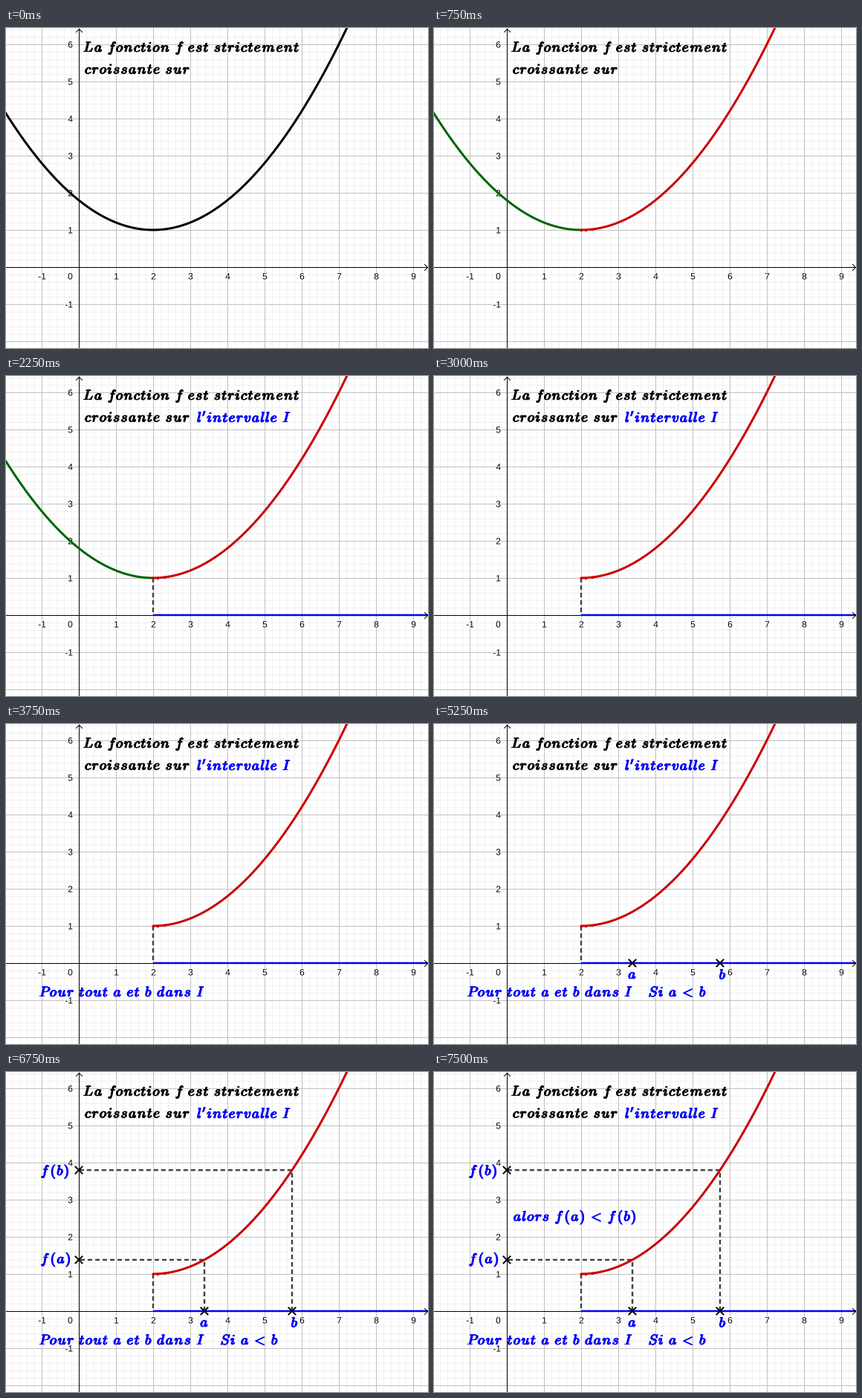
Write a matplotlib script that moves like this. It is 568 px wide and 431 px high and loops after 9750 ms.

```python
import numpy as np
import matplotlib.pyplot as plt
from matplotlib import patheffects
from matplotlib.animation import FuncAnimation
from matplotlib.mathtext import MathTextParser
from matplotlib.patches import PathPatch
from matplotlib.path import Path
from matplotlib.textpath import TextPath
from matplotlib.transforms import Affine2D

W, H, DPI = 568, 431, 64
PX = 72 / DPI                     # one pixel in points
OX, OY, UNIT = 98, 322, 50        # origin and unit length in pixels
STEP_MS, STEPS = 750, 13
BLACK, GRAY, GREEN, RED, BLUE = "#000000", "#404040", "#006400", "#cc0000", "#0000f5"

plt.rcParams["mathtext.fontset"] = "cm"
plt.rcParams["font.family"] = "Liberation Sans"
plt.rcParams["font.size"] = 10

fig = plt.figure(figsize=(W / DPI, H / DPI), dpi=DPI, facecolor="white")
ax = fig.add_axes([0, 0, 1, 1])
ax.set_xlim(0, W)
ax.set_ylim(H, 0)
ax.axis("off")

parser = MathTextParser("path")
layers = []                       # (artists, first step, end step)


def px(x):
    return OX + UNIT * x


def py(y):
    return OY - UNIT * y


def f(x):
    return 0.2 * (x - 2) ** 2 + 1


def line(xs, ys, color, width, z=3, **kw):
    return ax.plot(xs, ys, color=color, lw=width * PX, zorder=z, snap=False, **kw)


def hairline(xs, ys, color, z):
    """One-pixel line through pixel centres."""
    line(np.array(xs) + 0.5, np.array(ys) + 0.5, color, 1, z)


def show(first, artists, end=STEPS):
    layers.append((artists, first, end))


def glyph_source(char):
    return r"$^{\prime}$" if char == "'" else f"${char}$"


def math_text(x, base, text, color=BLUE, em=19, bold=1.17, smear=0.55):
    """Bold math italic: glyphs thickened sideways, advances grown in proportion."""
    gaps = {" ": 0.333, "\u200a": 0.11}
    paths = []
    for char in text:
        if char in gaps:
            x += gaps[char] * em
            continue
        src = glyph_source(char)
        natural = parser.parse(src, dpi=7200).width / 1000 * em
        glyph = TextPath((0, 0), src, size=em)
        for dx in (-smear, 0, smear):
            left = x + natural * (bold - 1) / 2 + dx
            paths.append(Affine2D().scale(1, -1).translate(left, base).transform_path(glyph))
        x += natural * bold
    patch = PathPatch(Path.make_compound_path(*paths), facecolor=color, edgecolor=color,
                      lw=0.3 * PX, joinstyle="round", zorder=8, snap=False)
    return [ax.add_patch(patch)]


def curve(x0, x1, color):
    xs = np.linspace(x0, x1, 200)
    return line(px(xs), py(f(xs)), color, 3, z=4, solid_capstyle="round")


def dashed(*points):
    xs, ys = zip(*points)
    return line(xs, ys, GRAY, 2.4, z=3, dashes=(6 / 2.4, 4 / 2.4), dash_capstyle="butt")


def cross(x, y, r=4.5):
    return (line([x - r, x + r], [y - r, y + r], BLACK, 2, z=7)
            + line([x - r, x + r], [y + r, y - r], BLACK, 2, z=7))


def grid(step, color, z):
    for x in np.arange(OX % step, W, step):
        hairline([x, x], [-1, H], color, z)
    for y in np.arange(OY % step, H, step):
        hairline([-1, W], [y, y], color, z)


def axes():
    hairline([-1, W], [OY, OY], BLACK, 2)
    hairline([OX, OX], [1, H], BLACK, 2)
    hairline([W - 5, W - 1, W - 5], [OY - 4, OY, OY + 4], BLACK, 6)
    hairline([OX - 4, OX, OX + 4], [5, 1, 5], BLACK, 2)


def label(x, y, text, align):
    halo = [patheffects.withStroke(linewidth=2 * PX, foreground="white")]
    ax.text(x, y, text, ha=align, va="baseline", size=12 * PX, color=BLACK,
            zorder=2.5, path_effects=halo)


grid(10, "#f0f0f0", 0)
grid(UNIT, "#c0c0c0", 1)
axes()
for n in range(-1, 10):
    if n:
        label(px(n) + 0.5, 338.5, str(n), "center")
    if n and n < 7:
        label(90, py(n) + 4.5, str(n), "right")
label(86.5, 338.5, "0", "center")

# Statement and curve
left, right = -2.1, 7.4
math_text(103, 32, "La fonction f est strictement", BLACK)
math_text(105.3, 61.5, "croissante sur", BLACK)
show(0, curve(left, right, BLACK), 1)
show(1, curve(left, 2, GREEN), 4)
dots = np.array([2, 2.12, 2.3])
show(1, curve(2, right, RED)
     + line(px(dots), py(f(dots)), RED, 0, z=4, marker="o", ms=3.6 * PX, mew=0))

# Interval I
show(2, dashed((px(2), py(1)), (px(2), OY)))
show(3, line([px(2), W], [OY, OY], BLUE, 2.5, z=5, solid_capstyle="butt")
     + math_text(256.5, 62, "l'intervalle I"))

# Points a and b, then their images
a, b = 3.38, 5.74
show(5, math_text(43.7, 367, "Pour tout a et b dans I"))
show(6, math_text(287.7, 367, "Si a\u200a<\u200ab"))
show(7, cross(px(a), OY) + cross(px(b), OY)
     + math_text(260.5, 343, "a") + math_text(383, 343.5, "b"))
for step, x, name, base in ((8, a, "a", 257.5), (9, b, "b", 139)):
    show(step, dashed((px(x), OY), (px(x), py(f(x))), (OX, py(f(x))))
         + cross(OX, py(f(x)))
         + math_text(46, base, f"f\u200a({name})"))
show(10, math_text(106, 200.5, "alors f\u200a(a)\u200a<\u200af\u200a(b)"))


def draw(step):
    for artists, first, end in layers:
        for artist in artists:
            artist.set_visible(first <= step < end)
    return []


anim = FuncAnimation(fig, draw, frames=STEPS, init_func=lambda: draw(0),
                     interval=STEP_MS, repeat=True, repeat_delay=0, blit=False)
plt.show()
```
